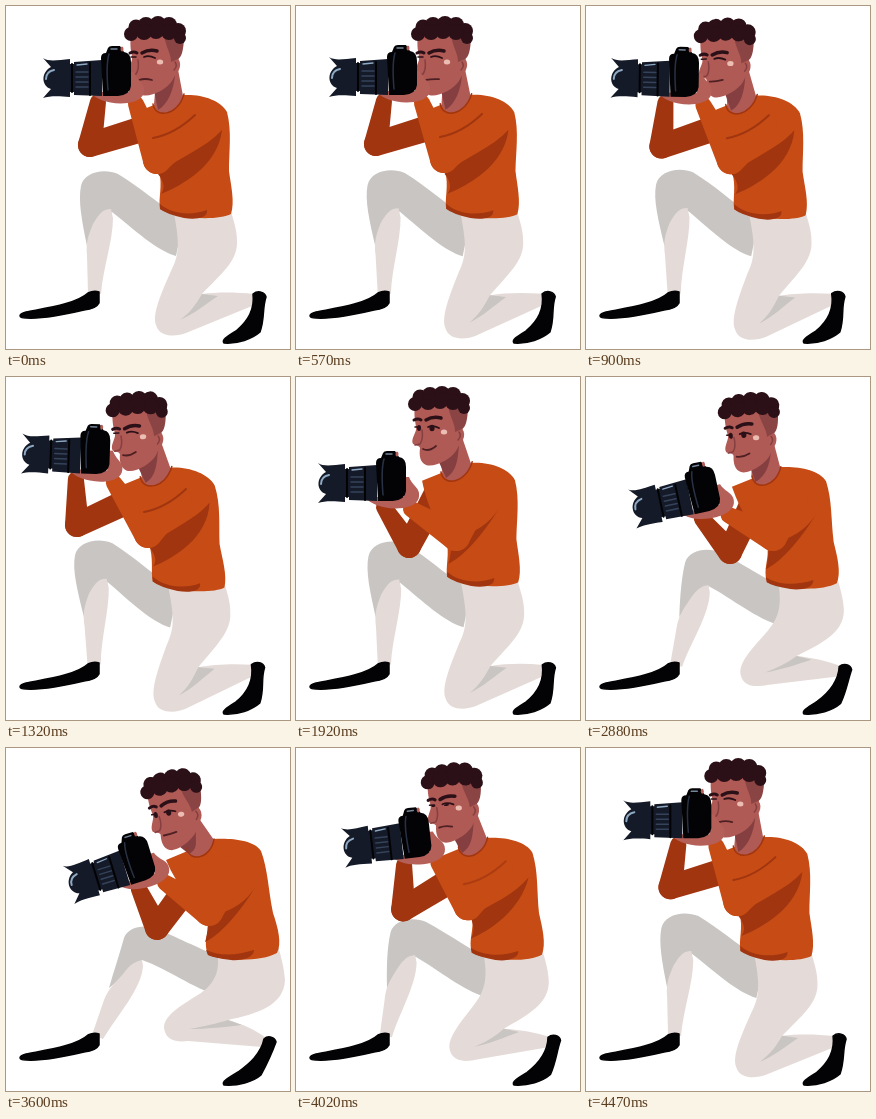
These frames come from a looping animation (284 by 343 pixels, 4500 ms). An HTML page with a canvas:

```html
<!DOCTYPE html>
<html lang="en">
<head>
<meta charset="utf-8">
<title>Kneeling photographer</title>
<style>
html, body { margin: 0; width: 100%; height: 100%; overflow: hidden; background: #fff; }
canvas { display: block; }
</style>
</head>
<body>
<canvas id="stage" width="284" height="343"></canvas>
<script>
const ctx = document.getElementById('stage').getContext('2d');
const LOOP = 4500;
const C = {
  shirt: '#c64b14', shirtDark: '#a1350f', cloth: '#e4dbd8', clothDark: '#c8c5c2',
  skin: '#b05a55', skinDark: '#853f40', hand: '#b55f59', hair: '#2b1017', fade: '#8a4443',
  black: '#030305', lens: '#151a28', ridge: '#35435a', glint: '#8faac4'
};

// time, crouch, rise, lean, head x y angle, camera x y angle,
// far elbow x y, near elbow x y, camera lowered, smile
const KEYS = [
  [0, 0, 0, 0, 0, 0, 0, 0, 0, 0, 84, 139, 151, 154, 0, 0],
  [570, -.08, 0, 0, -3, 0, 0, -4, -1, 0, 80, 138, 148, 153, 0, .2],
  [1320, -.14, 2, -8, -17, 4, -3, -21, 7, 2, 71, 148, 142, 157, 0, .8],
  [1920, -.06, -3, 0, -6, -1, 0, -15, 34, 0, 113, 169, 160, 160, 1, 1],
  [2250, 0, -4, 0, 0, -5, 0, -10, 36, 0, 116, 168, 164, 158, 1, 1],
  [2880, .56, 0, 0, 16, 5, -5, 6, 45, -12, 144, 175, 187, 160, 1, .7],
  [3600, 1, 0, 0, 21, 11, -11, 20, 44, -17, 151, 180, 203, 164, 1, .4],
  [4050, .42, 0, 0, 8, 4, -4, 8, 18, -6, 105, 160, 170, 158, .3, 0]
];

// Upright and crouched versions of each bending part
const PARTS = {
  thigh: ['M170 250C150 244 130 225 106 206L92 215L81 240C76 215 72 195 75 180C78 166 98 162 112 168C135 182 150 196 165 205L178 212Z',
          'M212 247C188 241 160 220 136 212L126 222L103 240C108 222 114 205 118 190C122 178 140 176 152 181C175 192 185 196 202 204L220 212Z'],
  shin: ['M105 203C98 203 94 206 87 218C81 232 80 238 81 250L82 287L95 288C97 262 107 235 107 212Z',
         'M136 212C130 214 126 214 117 226C106 238 102 242 98 252L86 287L97 291C111 268 136 240 137 218Z'],
  nearLeg: ['M166 198C174 235 174 248 165 265C155 288 146 308 150 319C154 333 172 330 180 327L246 300L248 288C230 286 210 286 196 288C215 268 232 255 231 235C231 224 228 216 224 202Z',
            'M210 200C217 225 205 238 195 245C178 256 158 266 158 280C160 294 172 294 182 293L256 299L260 290C250 282 236 276 222 272C250 266 278 258 279 232C278 220 276 212 272 198Z'],
  calfShade: ['M174 314C185 306 190 298 196 288L212 290C200 298 188 308 174 314Z',
              'M183 281C200 278 212 275 222 272L236 277C220 279 200 281 183 281Z'],
  backShoe: ['M247 288C252 284 259 286 260 291C256 303 259 312 254 326C246 333 232 338 218 337C215 334 222 330 230 325C240 317 249 305 247 288Z',
             'M258 291C262 287 269 289 270 294C266 305 262 314 255 327C247 334 232 338 218 337C215 334 222 330 232 324C243 316 255 306 258 291Z'],
  torso: ['M148 99L128 107C134 135 146 155 153 165C157 180 152 192 154 203C170 213 212 215 225 208C229 196 225 180 223 165C223 145 226 125 221 106C215 94 195 88 178 89Z',
          'M184 102L160 112C172 140 190 160 203 172C205 182 196 190 202 207C220 213 255 214 271 205C276 195 272 180 267 165C262 140 262 122 255 103C248 92 225 90 208 91Z'],
  hem: ['M154 198C165 208 185 210 201 204C202 212 190 214 178 212Q160 208 154 203Z',
        'M200 202C215 209 232 207 248 202C248 210 235 213 225 212Q208 210 202 207Z'],
  collar: ['M147 98C149 113 172 110 178 88', 'M181 100C183 115 205 111 208 91']
};

// Shirt shadow with the arm raised and with the arm lowered
const FOLD = ['M216 124C200 142 175 150 152 168C160 178 158 184 155 188C175 180 212 160 216 124Z',
              'M206 134C196 150 182 160 158 164C158 176 157 184 155 190C168 184 188 164 206 134Z'];

const HAIR = [[125, 28, 7], [130, 21, 7.5], [140, 19, 8], [152, 18, 8], [163, 19, 8],
              [172, 25, 8], [174, 32, 6], [163, 26, 8], [150, 25, 8], [138, 26, 8]];

const lerp = (a, b, t) => a + (b - a) * t;

function mix([from, to], t) {
  const ends = to.match(/\d+/g);
  let i = 0;
  return from.replace(/\d+/g, n => lerp(+n, +ends[i++], t).toFixed(2) + ' ');
}

function fill(path, color) {
  ctx.fillStyle = color;
  ctx.fill(new Path2D(path));
}

function stroke(path, color, width) {
  ctx.strokeStyle = color;
  ctx.lineWidth = width;
  ctx.stroke(new Path2D(path));
}

function shoe(path) {
  fill(path, C.black);
  stroke(path, C.black, 1.5);
}

function oval(x, y, rx, ry, color, angle = 0) {
  ctx.beginPath();
  ctx.ellipse(x, y, rx, ry, angle, 0, 7);
  ctx.fillStyle = color;
  ctx.fill();
}

function taper([ax, ay], ra, [bx, by], rb, color) {
  const angle = Math.atan2(by - ay, bx - ax);
  const spread = Math.acos((ra - rb) / Math.hypot(bx - ax, by - ay));
  ctx.beginPath();
  ctx.arc(ax, ay, ra, angle + spread, angle - spread + 2 * Math.PI);
  ctx.arc(bx, by, rb, angle - spread, angle + spread);
  ctx.fillStyle = color;
  ctx.fill();
}

function group(draw, dx, dy, degrees = 0, px = 0, py = 0) {
  ctx.save();
  ctx.translate(px + dx, py + dy);
  ctx.rotate(degrees * Math.PI / 180);
  ctx.translate(-px, -py);
  draw();
  ctx.restore();
}

// Periodic cubic through the keys without overshoot
function poseAt(time) {
  const n = KEYS.length;
  const key = (i, c) => KEYS[(i + n) % n][c] + (c ? 0 : Math.floor(i / n) * LOOP);
  let i = n - 1;
  while (KEYS[i][0] > time) i--;
  const span = key(i + 1, 0) - key(i, 0);
  const u = (time - key(i, 0)) / span;
  const slope = (j, c) => (key(j + 1, c) - key(j, c)) / (key(j + 1, 0) - key(j, 0));
  const tangent = (j, c) => {
    const a = slope(j - 1, c), b = slope(j, c);
    return a * b > 0 ? 2 * a * b / (a + b) : 0;
  };
  return KEYS[0].map((_, c) => c &&
    lerp(key(i, c), key(i + 1, c), u * u * (3 - 2 * u)) +
    span * u * (1 - u) * ((1 - u) * tangent(i, c) - u * tangent(i + 1, c)));
}

function drawNeck(x, y, crouch) {
  const dx = crouch * 31, dy = crouch * 2;
  fill(`M${150 + x} ${76 + y}L${171 + x} ${58 + y}L${177 + dx} ${90 + dy}C${172 + dx} ${109 + dy} ${150 + dx} ${112 + dy} ${148 + dx} ${98 + dy}Z`, C.skin);
  fill(`M${148 + x} ${84 + y}L${169 + x} ${68 + y}C${168 + x} ${84 + y} ${162 + dx} ${98 + dy} ${152 + dx} ${104 + dy}Z`, C.skinDark);
}

function drawHead(eye, smile) {
  oval(169, 60, 5, 8, C.skin, .2);
  fill('M125 28C123 45 127 49 126 54C124 60 121 64 123 68C126 70 129 69 130 72C129 80 130 86 136 89C144 92 161 83 166 75C168 71 170 68 172 62L174 30Z', C.skin);
  fill('M158 29L178 29C178 45 175 52 172 53L165 56C165 47 160 42 158 29Z', C.fade);
  stroke('M169 56Q172 60 168 64', C.skinDark, 1.5);
  HAIR.forEach(([x, y, r]) => oval(x, y, r, r, C.hair));
  stroke('M132 54C133 60 132 65 130 68L125 69', C.skinDark, 1.5);
  oval(154, 56, 3.2, 2.5, '#ecbdb3');
  const drop = (1 - eye) * 3;
  stroke(`M124 ${44 + drop}Q128 ${42 + drop} 131 ${44 + drop}`, C.hair, 3);
  stroke(`M136 ${44 + drop}Q143 ${40 + drop} 151 ${42 + drop}`, C.hair, 3.5);
  stroke('M138 51Q143 49 149 52', C.hair, 1.8);
  stroke('M125 51L130 51', C.hair, 1.5);
  if (eye > .05) {
    oval(142, 52, 2.6, 3.2 * eye, C.hair);
    oval(129, 52, 2, 3 * eye, C.hair);
  }
  stroke(`M133 ${74 - smile}Q139 ${72 + smile * 4} 146 ${74 - smile * 4}`, '#4e2024', 1.8);
}

function drawCamera() {
  fill('M84 86C90 94 105 99 122 97C134 95 139 90 138 82C137 76 131 74 128 66L123 66V86Z', C.hand);
  fill('M63 58H68V56L96 54V90L68 89V86H63Z', C.lens);
  fill('M37 52C43 56 52 54 64 53V91C52 90 43 90 37 92L45 83C35 80 35 66 45 61Z', C.lens);
  stroke('M66 58V86M84 57V89', C.black, 2);
  for (let y = 66; y < 86; y += 5) stroke(`M70 ${y}H82`, C.ridge, 1.5);
  stroke('M71 59L81 58', C.glint, 1.3);
  stroke('M40 73C40 68 43 65 48 64', C.glint, 2);
  fill('M95 52Q95 47 100 47L102 42Q103 40 106 40H114L118 46Q125 47 125 56V80Q124 89 112 90H97Z', C.black);
  stroke('M103 48C100 58 101 72 102 84', '#293244', 1.5);
  stroke('M105 43H111', '#74869a', 1.5);
  oval(116, 43, 1.5, 2.5, C.hand);
}

function draw(time) {
  const [, crouch, rise, lean, hx, hy, hr, cx, cy, cr, fx, fy, nx, ny, lowered, smile] = poseAt(time);
  const part = (name, color) => fill(mix(PARTS[name], crouch), color);
  const a = cr * Math.PI / 180;
  const onCamera = (x, y) => [110 + cx + x * Math.cos(a) - y * Math.sin(a),
                              64 + cy + x * Math.sin(a) + y * Math.cos(a)];
  ctx.fillStyle = '#fff';
  ctx.fillRect(0, 0, 284, 343);
  ctx.lineCap = ctx.lineJoin = 'round';

  part('thigh', C.clothDark);
  part('shin', C.cloth);
  shoe('M82 287Q88 284 93 286L93 297Q90 303 78 304C60 308 38 313 20 312C12 312 12 308 20 306C40 302 70 298 82 287Z');
  part('nearLeg', C.cloth);
  part('calfShade', C.clothDark);
  shoe(mix(PARTS.backShoe, crouch));

  const farShoulder = [lerp(143, 182, crouch) + lean, lerp(121, 138, crouch) + rise];
  taper(onCamera(lerp(-18, -7, lowered), 32), 8, [fx, fy], 12, C.shirtDark);
  taper([fx, fy], 12, farShoulder, 13, C.shirtDark);

  const k = lean / 110;
  ctx.save();
  ctx.transform(1, 0, -k, 1, k * 210, rise);
  part('torso', C.shirt);
  part('hem', C.shirtDark);
  group(() => fill(mix(FOLD, lowered), C.shirtDark), crouch * 44, crouch * 4);
  ctx.restore();
  group(() => {
    drawNeck(hx - lean, hy - rise, crouch);
    stroke(mix(PARTS.collar, crouch), C.shirtDark, 1.5);
  }, lean, rise);

  const nearShoulder = [lerp(183, 224, crouch) + lean, lerp(120, 124, crouch) + rise];
  taper([nx, ny], 14, nearShoulder, 16, C.shirt);
  taper(onCamera(20, 34), 8, [nx, ny], 14, C.shirt);
  ctx.globalAlpha = 1 - lowered;
  stroke(`M${nx - 4} ${ny - 22}Q${nx + 18} ${ny - 26} ${nx + 38} ${ny - 45}`, C.shirtDark, 2);
  ctx.globalAlpha = 1;

  group(() => drawHead(lowered, smile), hx, hy, hr, 150, 55);
  group(drawCamera, cx, cy, cr, 110, 64);
}

function tick() {
  draw(performance.now() % LOOP);
  requestAnimationFrame(tick);
}
tick();
</script>
</body>
</html>
```
